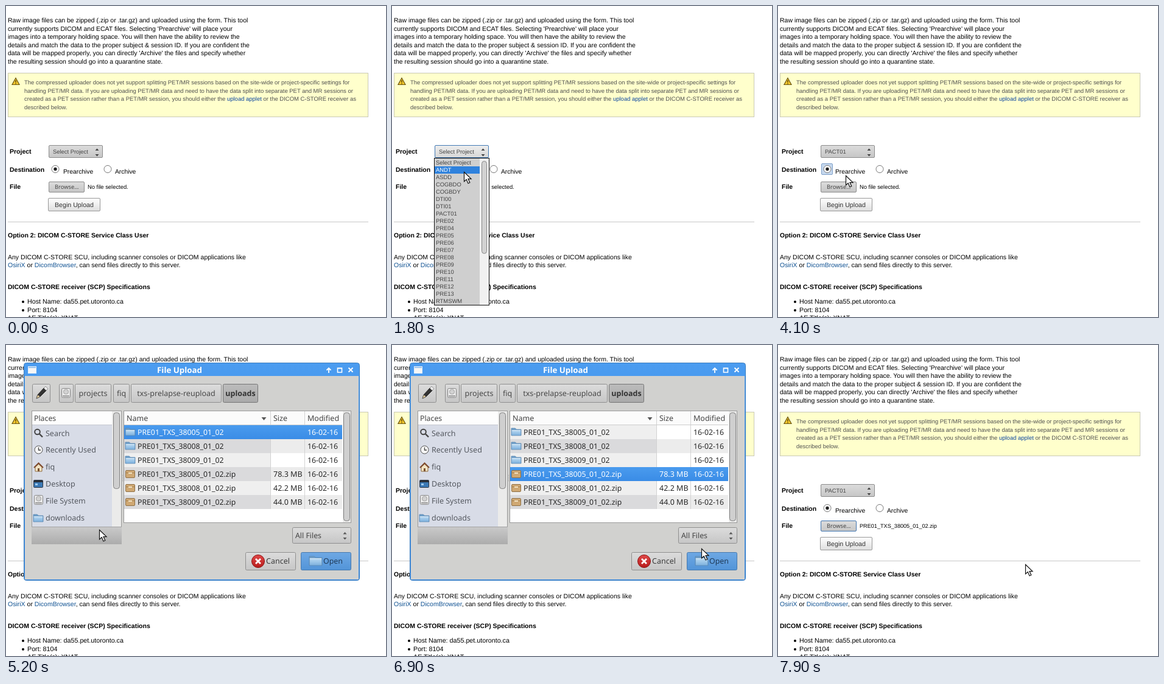
These frames come from a looping animation (624x512 px, 8000 ms). An HTML page:

```html
<!DOCTYPE html>
<html lang="en">
<head>
<meta charset="utf-8">
<title>Image upload</title>
<style>
html, body { margin: 0; width: 100%; height: 100%; overflow: hidden; background: #fff; }
svg { display: block; }
text { font-family: "Liberation Sans", Arial, sans-serif; text-rendering: geometricPrecision; }
.ui { font-family: "Noto Sans", "Open Sans", sans-serif; }
.b { font-weight: bold; }
.m { text-anchor: middle; }
</style>
</head>
<body>
<svg id="stage" width="624" height="512" viewBox="0 0 624 512"></svg>
<script>
const LOOP = 8000, STEP = 100;
const stage = document.getElementById('stage');

function el(parent, tag, attrs = {}) {
  const n = document.createElementNS('http://www.w3.org/2000/svg', tag);
  for (const k in attrs) n.setAttribute(k, attrs[k]);
  parent.appendChild(n);
  return n;
}
const group = parent => el(parent, 'g');
const defs = el(stage, 'defs');

function grad(id, ...colors) {
  const g = el(defs, 'linearGradient', { id, x1: 0, y1: 0, x2: 0, y2: 1 });
  colors.forEach((c, i) => el(g, 'stop', { offset: i / (colors.length - 1), 'stop-color': c }));
  return `url(#${id})`;
}
const fill = (g, x, y, width, height, color) => el(g, 'rect', { x, y, width, height, fill: color });
const box = (g, x, y, w, h, color, stroke, rx = 0) =>
  el(g, 'rect', { x: x + .5, y: y + .5, width: w - 1, height: h - 1, rx, fill: color, stroke });
const path = (g, d, color, stroke = 'none', width = 1) =>
  el(g, 'path', { d, fill: color, stroke, 'stroke-width': width });
const dot = (g, cx, cy, r, color, stroke = 'none') =>
  el(g, 'circle', { cx, cy, r, fill: color, stroke });

function text(g, x, y, str, size, color = '#000', cls = '') {
  const n = el(g, 'text', { x, y, 'font-size': size, fill: color, class: cls });
  n.textContent = str;
  return n;
}
function runs(g, x, y, size, color, parts) {
  const n = text(g, x, y, '', size, color);
  parts.forEach(([str, c]) => {
    el(n, 'tspan', { fill: c || color }).textContent = str;
  });
}
const show = (n, on) => n.setAttribute('display', on ? 'inline' : 'none');
const line = i => Math.round(i * 13.6);

const GREY = grad('grey', '#dcdcdc', '#c6c6c6');
const LIGHT = grad('light', '#eeeeee', '#d6d6d6');
const DARK = grad('dark', '#bcbcbc', '#aaaaaa');
const WHITE = grad('white', '#ffffff', '#dedede');
const BLUE = grad('blue', '#4a9bee', '#3a8ce6');
const OPEN = grad('open', '#6ea8e4', '#5294d8');
const FOOT = grad('foot', '#cacaca', '#acacac');
const FOLDER = grad('folder', '#b9d9f2', '#7fb2de');
const LINK = '#0f5192';
const INK = '#262626';
const TROUGH = '#ebebea';

// ---------- page ----------
const page = group(stage);
[
  'Raw image files can be zipped (.zip or .tar.gz) and uploaded using the form. This tool',
  "currently supports DICOM and ECAT files. Selecting 'Prearchive' will place your",
  'images into a temporary holding space. You will then have the ability to review the',
  'details and match the data to the proper subject & session ID. If you are confident the',
  "data will be mapped properly, you can directly 'Archive' the files and specify whether",
  'the resulting session should go into a quarantine state.'
].forEach((s, i) => text(page, 3, 27 + line(i), s, 10.52));

box(page, 3, 110, 592, 73, '#ffffcc', '#c9c9b4');
path(page, 'M16 118.5 L22 129.5 H10 Z', '#f3c62c', '#6a5512', 1.2);
path(page, 'M16 122 V126 M16 127 V128.5', 'none', '#3a2c00', 1.2);
[
  [['The compressed uploader does not yet support splitting PET/MR sessions based on the site-wide or project-specific settings for']],
  [['handling PET/MR data. If you are uploading PET/MR data and need to have the data split into separate PET and MR sessions or']],
  [['created as a PET session rather than a PET/MR session, you should either the '], ['upload applet', '#0b45a0'], [' or the DICOM C-STORE receiver as']],
  [['described below.']]
].forEach((parts, i) => runs(page, 30, 129 + line(i), 9.48, '#505050', parts));

text(page, 6, 243, 'Project', 10.5, '#000', 'b');
text(page, 6, 273, 'Destination', 10.5, '#000', 'b');
text(page, 6, 301, 'File', 10.5, '#000', 'b');

const select = box(page, 70, 229, 89, 21, GREY, '#8c8c8c', 1.5);
const choice = text(page, 77, 243, '', 9.4, '#444');
path(page, 'M146.5 238 L149.5 234.5 L152.5 238 Z M146.5 244 L149.5 247.5 L152.5 244 Z', '#444');

const radioGlow = box(page, 71, 259, 19, 19, '#c6d8ee', '#7e9fc8', 1.5);
dot(page, 81, 268.5, 6, '#fff', '#777');
dot(page, 81, 268.5, 2.7, '#222');
dot(page, 167, 268.5, 6, '#fff', '#777');
text(page, 94, 276, 'Prearchive', 10.3);
text(page, 179, 276, 'Archive', 10.3);

const browse = box(page, 70, 289, 59, 18, GREY, '#8c8c8c', 1.5);
text(page, 80, 301, 'Browse...', 9.3, '#444', 'ui');
const fileName = text(page, 134, 301, '', 9.4);
box(page, 69, 316, 86, 22, WHITE, '#989898', 1.5);
text(page, 80, 331, 'Begin Upload', 10.65, '#333');

fill(page, 3, 355, 592, 1, '#c8c8c8');
text(page, 3, 381, 'Option 2: DICOM C-STORE Service Class User', 10.5, '#000', 'b');
text(page, 3, 417, 'Any DICOM C-STORE SCU, including scanner consoles or DICOM applications like', 10.52);
runs(page, 3, 430, 10.52, '#000', [
  ['OsiriX', LINK], [' or '], ['DicomBrowser', LINK], [', can send files directly to this server.']
]);
text(page, 3, 466, 'DICOM C-STORE receiver (SCP) Specifications', 10.5, '#000', 'b');
['Host Name: da55.pet.utoronto.ca', 'Port: 8104', 'AE Title(s): XNAT'].forEach((s, i) => {
  dot(page, 28, 487 + line(i), 2, '#000');
  text(page, 35, 490 + line(i), s, 10.73);
});

// ---------- project list ----------
const list = group(stage);
const pre = [2, 4, 5, 6, 7, 8, 9, 10, 11, 12, 13].map(n => 'PRE' + String(n).padStart(2, '0'));
const projects = ['Select Project', 'ANDT', 'ASDD', 'COGBDO', 'COGBDY', 'DTI00', 'DTI01', 'PACT01', ...pre, 'RTMSWM'];
box(list, 69, 250, 91, 243, '#f1f1f1', '#111');
fill(list, 70, 251, 74, 241, '#cfcfcf');
const hover = fill(list, 70, 252, 74, 12, '#2f82dd');
box(list, 147, 255, 9, 153, '#d2d2d2', '#888', 4);
const items = projects.map((s, i) => text(list, 72, 261 + i * 12, s, 9.4, '#444'));

// ---------- file dialog ----------
const dialog = group(stage);

function folder(x, y, w = 16, h = 12) {
  path(dialog, `M${x} ${y} h${w * .4} l2 2 h${w * .6 - 2} v${h - 2} h${-w} Z`, '#6f9fc9', '#5784ae', .8);
  fill(dialog, x + .8, y + 3.5, w - 1.6, h - 4, FOLDER);
  fill(dialog, x + .8, y + 3.2, w - 1.6, 1, '#e4f1fb');
}
function drive(x, y) {
  box(dialog, x, y, 15, 16, '#e9e9e9', '#858585', 2);
  dot(dialog, x + 7.5, y + 6, 4, '#d2d2d2', '#a5a5a5');
  fill(dialog, x + 2, y + 12, 11, 2, '#9a9a9a');
}
function crate(x, y) {
  box(dialog, x, y, 16, 13, '#cfa873', '#8f7046', 1.5);
  fill(dialog, x + 1, y + 4, 14, 1, '#a3804f');
  fill(dialog, x + 5, y + 4, 6, 2, '#efe0c0');
}

box(dialog, 29, 29, 552, 359, grad('frame', '#4b9cf0', '#3788e2'), '#3f7fbe', 4);
fill(dialog, 30, 30, 550, 0, '#4b9cf0');
fill(dialog, 31, 51, 548, 335, '#d1d1cf');
box(dialog, 36, 35, 14, 12, '#f6f6f6', '#e3eefa');
fill(dialog, 37, 36, 12, 2, '#9cc4ec');
text(dialog, 285, 46, 'File Upload', 13.3, '#fff', 'ui b m');
path(dialog, 'M530 46 V38 M526.5 41.5 L530 38 L533.5 41.5', 'none', '#fff', 1.8);
path(dialog, 'M544.5 38 H551.5 V45 H544.5 Z M544 38.5 H552', 'none', '#fff', 1.6);
path(dialog, 'M562.5 37.5 L569.5 44.5 M569.5 37.5 L562.5 44.5', 'none', '#fff', 1.8);

box(dialog, 43, 64, 30, 31, GREY, '#8f8f8f', 2);
path(dialog, 'M50 88 L52 82 L63 70 L67 74 L56 85 Z', '#333', '#222', 1);
path(dialog, 'M50 88 L52 82 L56 85 Z', '#e8cf9a', '#555', .7);
path(dialog, 'M62 71 L65 68 L69 72 L66 75 Z', '#e9e9e9', '#777', .7);
[[87, 24, ''], [113, 60, 'projects'], [176, 27, 'fiq'], [205, 149, 'txs-prelapse-reupload'], [356, 58, 'uploads']]
  .forEach(([x, w, s], i) => {
    const on = i === 4;
    box(dialog, x, 64, w, 31, on ? DARK : GREY, on ? '#757575' : '#8f8f8f', 2);
    text(dialog, x + w / 2, 84, s, 12.5, on ? '#333' : '#484848', on ? 'ui b m' : 'ui m');
  });
drive(91, 71);

// places
box(dialog, 42, 108, 148, 220, TROUGH, '#9a9a9a');
fill(dialog, 43, 109, 131, 23, '#fdfdfd');
fill(dialog, 43, 131, 131, 168, '#d8dce7');
fill(dialog, 43, 131, 131, 1, '#c6c8d0');
text(dialog, 46, 125, 'Places', 12.3, '#444', 'ui');
box(dialog, 176, 111, 11, 126, '#cfcfcf', '#808080', 4);
fill(dialog, 42, 299, 148, 29, FOOT);
fill(dialog, 42, 299, 148, 1, '#a4a4a4');
['Search', 'Recently Used', 'fiq', 'Desktop', 'File System', 'downloads'].forEach((s, i) => {
  text(dialog, 65, 150 + Math.floor(i * 27.8), s, 12.5, '#555960', 'ui');
});
dot(dialog, 51.5, 143, 4.3, 'none', '#444').setAttribute('stroke-width', 2);
path(dialog, 'M55 146.5 L60 151.5', 'none', '#444', 2.4);
dot(dialog, 53.5, 172.5, 6.5, '#f7f7f7', '#555');
path(dialog, 'M53.5 168.5 V173 H57', 'none', '#444', 1.3);
path(dialog, 'M48 201 V208 H59 V201 L53.5 196 Z', '#f2e4c4', '#8f6a3c', 1);
path(dialog, 'M46 202 L53.5 194.5 L61 202', 'none', '#7e4a2c', 2);
fill(dialog, 52, 203, 3, 5, '#7b5230');
box(dialog, 45, 222, 16, 13, '#3b78b4', '#2c3440', 1);
fill(dialog, 46, 223, 14, 3, '#2a2f38');
fill(dialog, 48, 228, 4, 3, '#9cc9ee');
drive(46, 247);
folder(45, 279);
for (let i = 0; i < 4; i++) fill(dialog, 191, 214 + i * 3, 1, 1, '#8a8a8a');

// files
box(dialog, 193, 108, 374, 185, '#fff', '#9a9a9a');
fill(dialog, 194, 109, 358, 23, '#fbfbfb');
fill(dialog, 194, 131, 358, 1, '#cdcdcd');
fill(dialog, 553, 109, 13, 183, TROUGH);
box(dialog, 554, 111, 11, 179, '#cfcfcf', '#808080', 4);
text(dialog, 198, 125, 'Name', 12.5, '#444', 'ui');
text(dialog, 439, 125, 'Size', 12.5, '#444', 'ui');
text(dialog, 495, 125, 'Modified', 12.5, '#444', 'ui');
path(dialog, 'M419.5 119 H427.5 L423.5 124 Z', '#555');

const sizes = ['', '', '', '78.3 MB', '42.2 MB', '44.0 MB'];
const rows = sizes.map((size, i) => {
  const y = 132 + i * 23, odd = i % 2;
  // the lower half keeps the opposite stripe order
  const shaded = i > 2 ? i !== 4 : odd;
  fill(dialog, 194, y, 240, 23, shaded ? '#dadadc' : '#efefef');
  fill(dialog, 434, y, 118, 23, odd ? '#ececec' : '#fff');
  [434, 490].forEach(x => fill(dialog, x, y, 1, 23, '#d2d2d2'));
  const mark = fill(dialog, 194, y, 358, 23, BLUE);
  const name = `PRE01_TXS_3800${[5, 8, 9][i % 3]}_01_02${i > 2 ? '.zip' : ''}`;
  if (i > 2) crate(196, y + 5); else folder(196, y + 5);
  const words = [[216, name, 12.27], [439, size, 12.5], [495, '16-02-16', 12.3]]
    .map(([x, s, px]) => text(dialog, x, y + 16, s, px, INK, 'ui'));
  return { mark, words };
});
[434, 490].forEach(x => fill(dialog, x, 109, 1, 22, '#d2d2d2'));

box(dialog, 470, 300, 97, 27, GREY, '#8f8f8f', 2);
text(dialog, 475, 318, 'All Files', 12.3, '#444', 'ui');
path(dialog, 'M553.5 311.5 L556.5 308 L559.5 311.5 Z M553.5 317 L556.5 320.5 L559.5 317 Z', '#555');
box(dialog, 393, 341, 83, 30, GREY, '#8f8f8f', 2);
dot(dialog, 414, 356, 10.5, grad('red', '#e04848', '#b81c1c'), '#8f1414');
path(dialog, 'M410 352 L418 360 M418 352 L410 360', 'none', '#fff', 2.8);
text(dialog, 427, 360, 'Cancel', 12.5, '#3c3c3c', 'ui');
box(dialog, 484, 341, 83, 30, OPEN, '#4679ae', 2);
folder(498, 348, 21, 15);
text(dialog, 521, 360, 'Open', 12.4, '#1f3a58', 'ui');

// ---------- pointer ----------
const pointer = path(stage, 'M.5 .5 V16 L4.2 12.6 L7 19 L9.8 17.8 L7 11.6 H12 Z', '#fff', '#111', 1.2);
const route = [
  [500, 330, 520], [1200, 122, 242], [1400, 122, 242], [1800, 118, 273], [2000, 118, 275],
  [2800, 103, 336], [3100, 103, 337], [4100, 111, 279], [4400, 105, 297], [4700, 105, 297],
  [5200, 153, 304], [5900, 265, 212], [6200, 265, 212], [6900, 508, 335], [7200, 512, 348],
  [7900, 406, 361]
];
function pointerAt(t) {
  let i = 1;
  while (i < route.length - 1 && t > route[i][0]) i++;
  const [t0, x0, y0] = route[i - 1], [t1, x1, y1] = route[i];
  const k = Math.max(0, Math.min(1, (t - t0) / (t1 - t0)));
  const e = k * k * (3 - 2 * k);
  return [x0 + (x1 - x0) * e, y0 + (y1 - y0) * e];
}
const within = (t, a, b) => t >= a && t < b;

function draw(t) {
  const [x, y] = pointerAt(t);
  const listOpen = within(t, 1400, 3000), dialogOpen = within(t, 4700, 7300);
  const done = t >= 7300;

  show(pointer, t >= 500);
  pointer.setAttribute('transform', `translate(${Math.round(x)} ${Math.round(y)})`);

  show(list, listOpen);
  const row = Math.max(0, Math.min(19, Math.floor((Math.round(y) - 252) / 12)));
  hover.setAttribute('y', 252 + row * 12);
  items.forEach((n, i) => n.setAttribute('fill', i === row ? '#fff' : '#444'));

  const overSelect = t < 1400 && x < 159 && y > 229 && y < 250;
  select.setAttribute('fill', listOpen && t >= 2000 ? DARK : listOpen || overSelect ? LIGHT : GREY);
  select.setAttribute('stroke', listOpen ? '#4179b4' : '#8c8c8c');
  choice.textContent = t < 3000 ? 'Select Project' : 'PACT01';

  show(radioGlow, within(t, 3000, 4700) && y > 260 && y < 283);
  browse.setAttribute('stroke', done ? '#3f74b0' : '#8c8c8c');
  fileName.textContent = done ? 'PRE01_TXS_38005_01_02.zip' : 'No file selected.';
  fileName.setAttribute('font-size', done ? 9.15 : 9.4);

  show(dialog, dialogOpen);
  const picked = t < 6100 ? 0 : 3;
  rows.forEach((r, i) => {
    show(r.mark, i === picked);
    r.words.forEach(n => n.setAttribute('fill', i === picked ? '#fff' : INK));
  });
}

const start = performance.now();
function tick() {
  const t = (performance.now() - start) % LOOP;
  draw(Math.floor(t / STEP) * STEP);
  requestAnimationFrame(tick);
}
draw(0);
requestAnimationFrame(tick);
</script>
</body>
</html>
```
